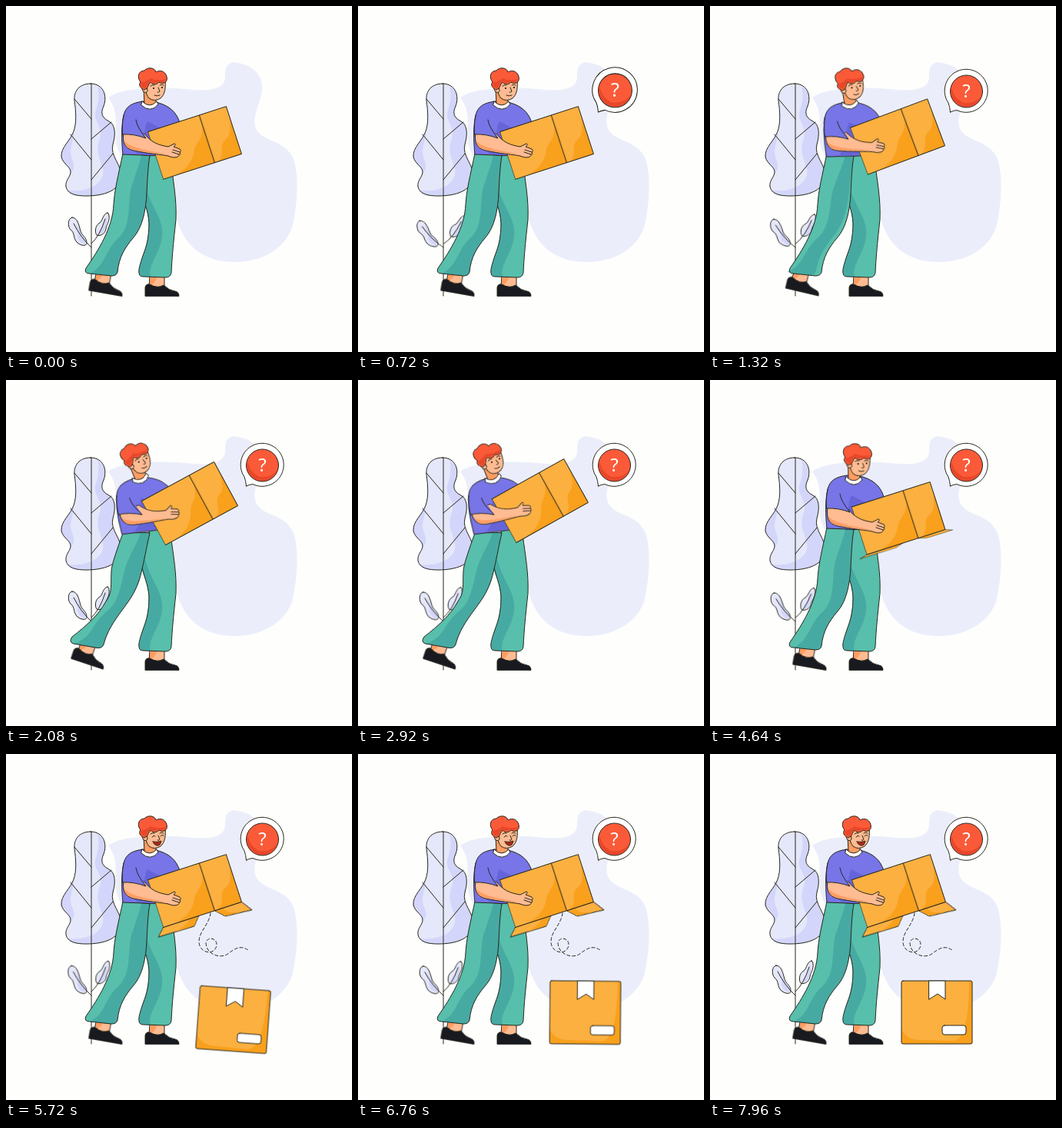
An HTML page without scripts for the animation above (8 s loop, 450 by 450 pixels).

```html
<!DOCTYPE html>
<html lang="en">
<head>
<meta charset="utf-8">
<title>Unpacking</title>
<style>
html,body{margin:0;width:100%;height:100%;overflow:hidden;background:#fefefd}
svg{display:block;width:100vw;height:100vh}
path,circle,rect{stroke-linejoin:round;stroke-linecap:round}
.ln{stroke:#26261c;stroke-width:1}
.no{fill:none}
.blob{fill:#ebeefa}
.leaf{fill:#e5e7fa}.leafd{fill:#d3d6fa}
.skin{fill:#ffbb91}.skind{fill:#ff9d62}
.shirt{fill:#7775e7}.shirtd{fill:#6664d9}
.teal{fill:#57bfab}.teald{fill:#47aaa2}
.box{fill:#fbb040}.boxd{fill:#f9a01c}
.hair{fill:#fb5a38}.haird{fill:#e8472a}
.shoe{fill:#181a20}.white{fill:#fff}

.tw,.shoeB,.legB,.legS,.torso,.head,.arm,.carton,.flap,.drop,.bubble,.trail{
  animation:8s ease-in-out infinite}

/* walking leg */
.legB{
  --up:path("M152 192C146 220 141 240 140 258C139 288 120 318 104 341Q101 348 109 348L137 351Q144 351 145 346C147 326 155 314 165 302C178 288 182 264 183 244C184 222 185 206 187 195Z");
  --back:path("M152 199C144 222 138 238 137 248C136 272 138 276 130 288C120 306 104 320 86 334Q81 341 88 343L116 348Q125 350 127 344C131 328 140 314 152 298C164 282 172 270 177 246C181 228 184 212 187 199Z");
  animation-name:leg}
.legS{
  --up:path("M187 195C185 206 184 222 183 244C182 264 178 288 165 302C155 314 147 326 145 346Q144 351 137 351L109 348C130 338 128 318 146 302C166 284 156 250 165 230C170 214 174 204 176 194Z");
  --back:path("M187 199C184 212 181 228 177 246C172 270 164 282 152 298C140 314 131 328 127 344Q125 350 116 348L88 343C112 336 112 316 132 300C152 284 150 250 160 232C167 216 172 208 175 199Z");
  animation-name:leg}
.legB,.legS{d:var(--up)}
@keyframes leg{
  0%,9%,57%,100%{d:var(--up)}
  26%,47%{d:var(--back)}}
.shoeB{animation-name:shoe}
@keyframes shoe{
  0%,9%,57%,100%{transform:translate(150px,377px) rotate(10deg)}
  26%,47%{transform:translate(125.5px,375.5px) rotate(18.5deg)}}

/* upper body */
.torso{transform-origin:169px 195px;animation-name:torso}
@keyframes torso{
  0%,9%,57%,100%{transform:none}
  26%,47%{transform:translate(-1px,5px) rotate(-9deg)}}
.head{transform-origin:185px 126px;animation-name:head}
@keyframes head{
  0%,9%,62%,100%{transform:none}
  26%,39.7%{transform:translate(0,-2.5px) rotate(-11deg)}
  32.8%,46.5%{transform:translate(2px,-1.5px) rotate(-9deg)}
  57%{transform:translate(0,2px) rotate(2deg)}}
.arm{transform-origin:156px 175px;animation-name:arm}
@keyframes arm{
  0%,9%,62%,100%{transform:none}
  26%,39.7%{transform:translate(-3px,4px) rotate(-18deg)}
  32.8%,46.5%{transform:translate(-2px,4px) rotate(-27deg)}
  57%{transform:translate(0,2px)}}
.calm{animation:calm 8s step-end infinite}
.glad{animation:glad 8s step-end infinite}
@keyframes calm{0%{opacity:1}62%,100%{opacity:0}}
@keyframes glad{0%{opacity:0}62%,100%{opacity:1}}

/* carried carton */
.carton{animation-name:carton}
@keyframes carton{
  0%,9%,62%,100%{transform:translate(245.5px,178px) rotate(-18deg)}
  9%{animation-timing-function:ease-in}
  16.5%{transform:translate(244px,170px) rotate(-20.5deg);animation-timing-function:ease-out}
  26%,39.7%{transform:translate(239px,160.5px) rotate(-28.5deg)}
  32.8%,46.5%{transform:translate(234px,152.5px) rotate(-30deg)}
  57%{transform:translate(245px,180px) rotate(-17.7deg)}}
.flap{transform-origin:0 32.5px;animation-name:flap}
@keyframes flap{
  0%,56.4%{opacity:0;transform:scaleY(0)}
  56.5%{opacity:1;transform:scaleY(0)}
  61%{opacity:1;transform:scaleY(1.15)}
  63.5%,100%{opacity:1;transform:none}}

/* parcel and its path */
.drop{animation-name:drop}
@keyframes drop{
  0%,63.9%{opacity:0;transform:translate(256px,192px) rotate(-18deg) scale(.1)}
  64%{opacity:1;transform:translate(256px,192px) rotate(-18deg) scale(.1);animation-timing-function:ease-in}
  69.5%{transform:translate(294px,330px) rotate(-2deg) scale(.98);animation-timing-function:ease-out}
  71.5%,72%{transform:translate(295.5px,345.5px) rotate(4.2deg)}
  77%{transform:translate(297px,334px) rotate(-3deg)}
  82%{transform:translate(296px,337px) rotate(1.6deg)}
  87%{transform:translate(295px,335.5px) rotate(-.6deg)}
  91%,100%{opacity:1;transform:translate(295px,336px)}}
.trail{stroke-dasharray:1;stroke-dashoffset:1;animation-name:trail}
@keyframes trail{0%,65%{stroke-dashoffset:1}71%,100%{stroke-dashoffset:0}}

.bubble{transform-origin:313px 138px;animation-name:pop}
@keyframes pop{
  0%,2.5%{transform:scale(0)}
  7%{transform:scale(1.22)}
  10.5%{transform:scale(.94)}
  14%{transform:scale(1.02)}
  16.5%,100%{transform:none}}

.tw{transform-origin:111px 314px;animation-name:sway}
@keyframes sway{
  0%,26%,66%,100%{transform:none}
  10%{transform:rotate(calc(var(--k)*9deg))}
  16.5%{transform:rotate(calc(var(--k)*5deg))}
  36%,46.5%,86%{transform:rotate(calc(var(--k)*2deg))}
  50.5%{transform:rotate(calc(var(--k)*8deg))}
  58%{transform:rotate(calc(var(--k)*4deg))}
  71.5%{transform:rotate(calc(var(--k)*1deg))}}
</style>
</head>
<body>
<svg viewBox="0 0 450 450">
  <defs>
    <g id="shoe">
      <path class="skin ln" d="M-37-28L-38-10Q-28-3-18-11L-18-28Z"/>
      <path class="skind" d="M-37-27H-26Q-30-16-37-12Z"/>
      <path class="shoe ln" d="M-43 0L-43-11Q-42-16-37-15Q-27-9-19-14Q-12-7-4-6Q1-5 1 0Z"/>
    </g>
    <path id="big" d="M110 101C95 101 88 111 89 123C91 137 92 152 88 163C84 175 71 184 72 196C74 206 85 209 84 217C83 223 77 227 78 235C80 245 92 247 104 247C128 247 148 240 150 222C150 205 135 195 139 180C143 166 142 154 134 150C124 145 123 139 127 130C132 117 127 101 110 101Z"/>
    <path id="curl" d="M266 207C264 222 251 231 251 244C251 259 271 263 274 249C275 239 262 237 260 245C260 260 277 266 287 261C298 253 304 248 315 255"/>
    <path id="front" d="M187 195C179 214 176 228 176 238C178 254 185 264 186 282C186 300 183 312 179 322C174 336 172 344 173 347Q173 352 179 352L207 353Q214 353 215 347C216 325 218 305 221 278C222 250 218 232 214 200L212 188Z"/>
    <mask id="reveal" maskUnits="userSpaceOnUse" x="230" y="190" width="110" height="90">
      <path class="trail" pathLength="1" fill="none" stroke="#fff" stroke-width="5" d="M266 207C264 222 251 231 251 244C251 259 271 263 274 249C275 239 262 237 260 245C260 260 277 266 287 261C298 253 304 248 315 255"/>
    </mask>
  </defs>

  <path class="blob" d="M133 119C150 106 200 104 245 109C272 111 285 105 285 92C284 76 292 71 302 74C322 77 335 92 333 110C331 128 318 145 326 161C336 178 362 174 373 197C382 218 379 262 372 288C364 312 338 332 300 333C262 334 234 316 223 280C212 240 160 230 145 185C138 160 150 142 133 119Z"/>

  <!-- plant -->
  <use href="#big" class="leaf"/>
  <path class="leafd" d="M119 104C128 110 131 119 127 130C123 139 124 145 134 150C142 154 143 166 139 180C135 195 150 205 150 222C148 240 128 247 104 247C92 247 84 246 80 240C104 243 130 232 126 212C122 196 116 190 122 172C127 158 114 150 116 138C120 128 122 114 119 104Z"/>
  <path class="leafd" d="M88 163C84 175 71 184 72 196C74 206 85 209 84 217C94 208 84 200 84 190C84 180 88 176 88 163Z"/>
  <use href="#big" class="ln no"/>
  <path class="ln no" d="M111 101V377M89 121L111 147M84 167L111 200M137 151L111 173M139 192L111 226"/>
  <g class="tw" style="--k:-1">
    <path class="leaf ln" d="M86 275C80 276 80 287 84 291C90 295 87 303 93 308C98 312 105 313 105 308C105 301 99 299 97 293C95 285 93 275 86 275Z"/>
    <path class="leafd" d="M93 300Q95 308 103 310Q104 302 98 298Q95 288 90 281Q95 294 93 300Z"/>
    <path class="ln no" d="M88 283Q97 301 111 314"/>
  </g>
  <g class="tw" style="--k:1">
    <path class="leaf ln" d="M132 269C126 270 126 279 122 282C116 285 115 294 118 298C121 300 129 297 130 290C130 285 135 281 134 273Q134 269 132 269Z"/>
    <path class="leafd" d="M131 273Q128 287 120 297Q128 296 129 289Q132 281 131 273Z"/>
    <path class="ln no" d="M129 277Q122 299 111 309"/>
  </g>

  <!-- legs -->
  <use href="#shoe" x="224" y="377"/>
  <g class="shoeB"><use href="#shoe"/></g>
  <use href="#front" class="teal"/>
  <path class="teald" d="M178 220C175 234 176 246 180 256C189 280 186 302 179 322C174 336 172 344 173 347Q173 352 179 352L188 352C183 335 206 318 203 290C200 268 184 256 178 220Z"/>
  <use href="#front" class="ln no"/>
  <path class="legB teal"/>
  <path class="legS teald"/>
  <path class="legB ln no"/>

  <!-- torso and head -->
  <g class="torso">
    <path class="shirt ln" d="M178 124C164 126 156 130 153 142C150 155 150 175 152 193L204 195L226 152C222 138 212 129 195 125Z"/>
    <path class="shirtd" d="M184 150C176 165 186 178 168 192L203 194L213 165Z"/>
    <g class="head">
      <path class="skind ln" d="M179 108L180 127Q187 134 195 127L195 116Z"/>
      <path class="white ln" d="M177 124Q187 134 196 124L198 128Q188 140 176 129Z"/>
      <path class="skin ln" d="M181 95C180 104 181 114 186 120Q193 125 201 120C207 115 208 106 207 95Z"/>
      <path class="skin ln" d="M183 106C178 101 175 107 179 112Q182 114 184 111Z"/>
      <path class="hair ln" d="M179 109C174 106 172 102 175 99C170 93 172 84 180 84C184 79 194 80 195 86C201 82 208 86 209 92C211 98 205 103 199 99C195 104 189 101 188 99C184 103 185 107 182 108Z"/>
      <path class="haird" d="M175 100Q183 98 188 94Q197 98 208 95Q206 101 199 98Q193 102 188 98Q183 102 181 107Q175 106 175 100Z"/>
      <path class="ln no" d="M188 104Q190 102 193 103M200 103Q203 101 205 103M198 106L200 111Q199 113 197 112"/>
      <g class="calm">
        <circle cx="192" cy="107" r="1"/><circle cx="203" cy="106" r="1"/>
        <path class="ln no" d="M193 116Q196 118 200 116"/>
      </g>
      <g class="glad">
        <path class="ln no" d="M190 108Q192 105 194 107M201 107Q203 104 205 106"/>
        <path fill="#a92a1c" stroke="#26261c" stroke-width=".8" d="M191 114Q197 115 202 113Q201 120 196 119Q192 118 191 114Z"/>
      </g>
    </g>
  </g>

  <g mask="url(#reveal)"><use href="#curl" class="ln no" stroke-dasharray="4 3"/></g>

  <!-- parcel -->
  <g class="drop">
    <rect class="box" x="-46" y="-41" width="92" height="82" rx="2"/>
    <path class="boxd" d="M-46 20Q-42 36-20 36L20 37Q42 38 42-41H44Q46-41 46-39V39Q46 41 44 41H-44Q-46 41-46 39Z"/>
    <rect class="ln no" x="-46" y="-41" width="92" height="82" rx="2"/>
    <path class="white ln" d="M-10-41H11V-17L1-24L-10-17Z"/>
    <rect class="white ln" x="7" y="17" width="31" height="12" rx="3"/>
  </g>

  <!-- carton -->
  <g class="carton">
    <g class="flap">
      <path class="box ln" d="M-53.5 32.5L-63.7 42.5L-14.7 43.5L-5 32.5Z"/>
      <path class="boxd" d="M-40 42.5L-15 43L-6 33H-18Q-25 41-40 42.5Z"/>
      <path class="box ln" d="M16.7 32.5L27.4 43.6L63.1 46.5L53.5 32.5Z"/>
      <path class="boxd" d="M20 35.5L28 43L50 45Q30 41 28 33H18Z"/>
    </g>
    <path class="box" d="M-53.5-32.5H53.5V32.5H-53.5Z"/>
    <path class="boxd" d="M-40 32.5C-20 30-10 22-4 10C2-2 14 0 16.7-22V32.5ZM20 32.5C34 28 28 12 40 8C50 4 50-8 53.5-16V32.5Z"/>
    <path class="ln no" d="M-53.5-32.5H53.5V32.5H-53.5ZM16.7-32.5V32.5"/>
  </g>

  <!-- near arm -->
  <g class="arm">
    <path class="skin ln" d="M153 163C151 178 154 185 166 188C185 192 200 193 211 195C220 199 226 196 225 193Q228 193 226 190Q229 189 226 186L218 183Q222 180 219 179L211 183C198 181 188 177 180 166Z"/>
    <path class="skind" d="M154 176C156 184 160 186 168 187.500L208 193.500C194 188 168 188 154 176Z"/>
    <path class="ln no" d="M217 187L226 190M216 190L225 193"/>
  </g>
  <g class="torso">
    <path class="shirt" d="M153 145C151 152 151 160 151.500 167Q166 166 182 172C176 160 172 150 170 146Z"/>
    <path class="ln no" d="M153 142C151 152 151 160 151.500 167Q166 166 182 172C176 164 170 156 169 148"/>
  </g>

  <g class="bubble">
    <path class="white ln" d="M312.500 138Q312 131 310 126A28 28 0 1 1 321 135.500Q316 136 312.500 138Z"/>
    <circle class="hair ln" cx="333.500" cy="111" r="21"/>
    <path class="haird" d="M314 104A20.500 20.500 0 1 0 353 117Q344 128 330 126Q316 120 314 104Z"/>
    <text x="333.500" y="119" fill="#fff" text-anchor="middle" font-size="24" font-family="'Noto Sans','Open Sans',sans-serif">?</text>
  </g>
</svg>
</body>
</html>
```
